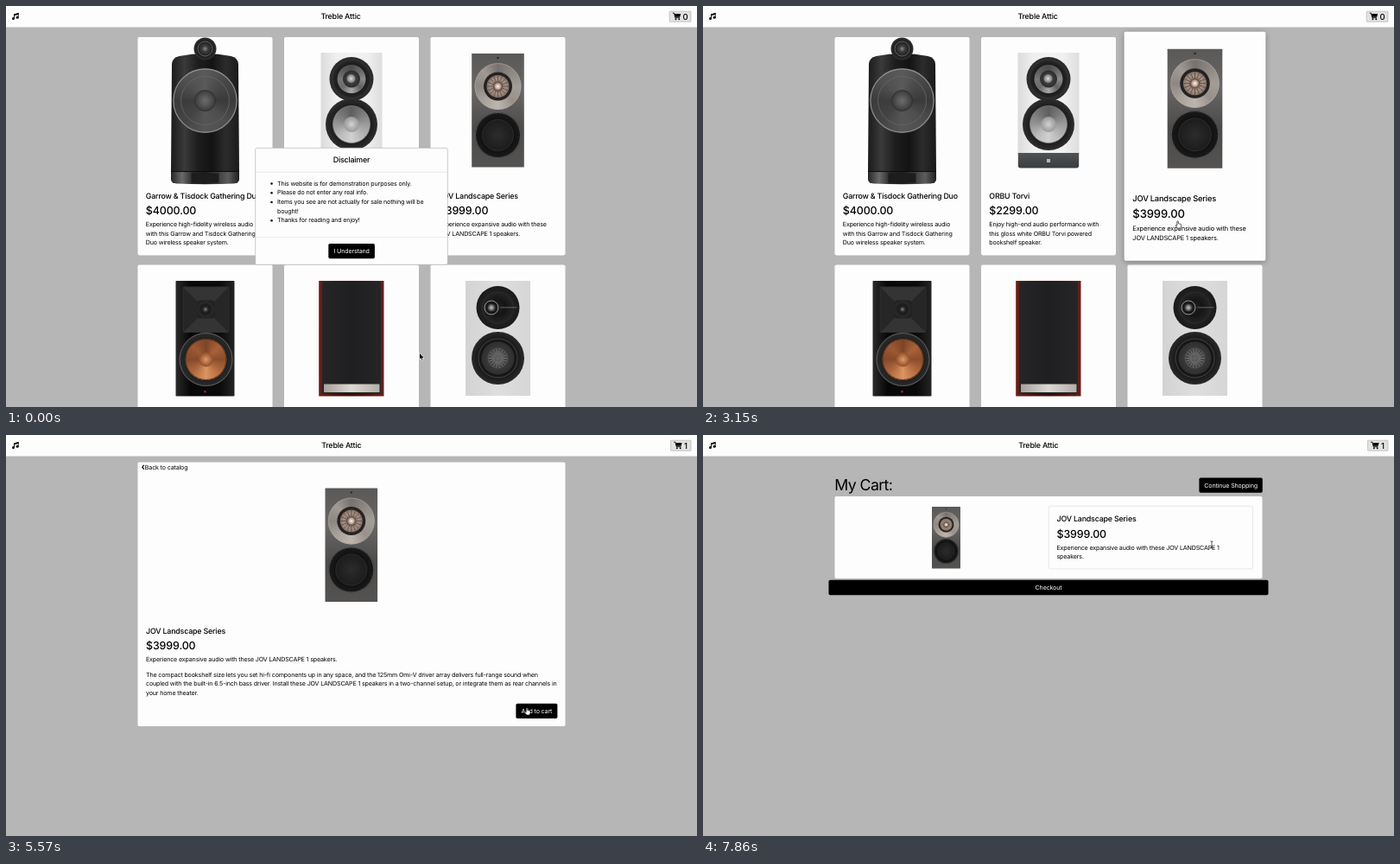
Write an HTML page with a canvas that moves like this. It is 800 by 464 pixels and loops after 8000 ms.

```html
<!DOCTYPE html>
<html lang="en">
<head>
<meta charset="utf-8">
<title>Treble Attic</title>
<style>
html, body { margin: 0; width: 100%; height: 100%; overflow: hidden; background: #b6b6b6; }
canvas { display: block; width: 800px; height: 464px; }
</style>
</head>
<body>
<canvas id="stage"></canvas>
<script>
const W = 800, H = 464, LOOP = 8000, FPS = 7;
const canvas = document.getElementById('stage');
const dpr = window.devicePixelRatio || 1;
canvas.width = W * dpr;
canvas.height = H * dpr;
const ctx = canvas.getContext('2d');
ctx.scale(dpr, dpr);

const WHITE = '#fdfdfd', GREY = '#b6b6b6', BLACK = '#000';
const BODY = 7.11, HEAD = 8.89, PRICE = 12.44, LEAD = 10.67;

// ---- helpers ----
function text(s, x, y, size = BODY, { weight = 400, align = 'left', color = BLACK, track = -0.022 } = {}) {
  ctx.font = `${weight} ${size}px Inter, "Liberation Sans", sans-serif`;
  ctx.letterSpacing = `${track * size}px`;
  ctx.textRendering = 'geometricPrecision';
  ctx.textAlign = align;
  ctx.fillStyle = color;
  ctx.fillText(s, x, y);
}
const lines = (list, x, y) => list.forEach((s, i) => text(s, x, y + i * LEAD));

function box(x, y, w, h, fill, r = 0, stroke) {
  ctx.beginPath();
  ctx.roundRect(x, y, w, h, r);
  ctx.fillStyle = fill;
  ctx.fill();
  if (stroke) {
    ctx.strokeStyle = stroke;
    ctx.lineWidth = 0.6;
    ctx.stroke();
  }
}

function button(label, x, y, w, h) {
  box(x, y, w, h, BLACK, 1.8);
  text(label, x + w / 2, y + h / 2 + 2.6, BODY, { align: 'center', color: '#fff' });
}

function fade(gradient, colors) {
  colors.forEach((c, i) => gradient.addColorStop(i / Math.max(1, colors.length - 1), c));
  return gradient;
}
const across = (x0, x1, ...colors) => fade(ctx.createLinearGradient(x0, 0, x1, 0), colors);
const down = (y0, y1, ...colors) => fade(ctx.createLinearGradient(0, y0, 0, y1), colors);

function circle(x, y, r, fill) {
  ctx.beginPath();
  ctx.arc(x, y, r, 0, 7);
  ctx.fillStyle = fill;
  ctx.fill();
}
const disc = (x, y, r, ...colors) =>
  circle(x, y, r, fade(ctx.createRadialGradient(x, y, 0, x, y, r), colors));
// brushed metal: colours run clockwise from the top
const sheen = (x, y, r, ...colors) =>
  circle(x, y, r, fade(ctx.createConicGradient(-Math.PI / 2, x, y), [...colors, colors[0]]));

function ring(x, y, r, color, width = 1) {
  ctx.beginPath();
  ctx.arc(x, y, r, 0, 7);
  ctx.strokeStyle = color;
  ctx.lineWidth = width;
  ctx.stroke();
}

function spokes(x, y, r0, r1, n, color, width) {
  ctx.beginPath();
  for (let i = 0; i < n; i++) {
    const a = i / n * Math.PI * 2, c = Math.cos(a), s = Math.sin(a);
    ctx.moveTo(x + c * r0, y + s * r0);
    ctx.lineTo(x + c * r1, y + s * r1);
  }
  ctx.strokeStyle = color;
  ctx.lineWidth = width;
  ctx.stroke();
}

function placed(x, y, scale, draw) {
  ctx.save();
  ctx.translate(x, y);
  ctx.scale(scale, scale);
  draw();
  ctx.restore();
}

// ---- speakers: x = 0 is the card's middle, y = 0 its top ----
function domeSpeaker() {
  const body = new Path2D('M-38.5 31Q-38 24 -30 22Q0 16 30 22Q38 24 38.5 31L39.5 156H-39.5Z');
  ctx.fillStyle = across(-40, 40, '#1a1a1a', '#3a3a3a', '#1d1d1d', '#131313', '#2c2c2c', '#191919');
  ctx.fill(body);
  ctx.fillStyle = across(-40, 40, '#222', '#6a6a6a', '#262626', '#1c1c1c', '#3a3a3a', '#5c5c5c', '#1c1c1c');
  ctx.fill(new Path2D('M-39.5 155.5H39.5V165Q39 169 33 169.5Q0 171 -33 169.5Q-39 169 -39.5 165Z'));
  box(-39.5, 155, 79, 1, '#0c0c0c');
  box(-16, 157.5, 32, 11, '#1d1d1d');
  disc(0, 13.5, 13, '#4a4a4a', '#383838', '#1b1b1b', '#303030');
  ring(0, 13.5, 8.5, '#777', 0.8);
  disc(0, 13.5, 3.6, '#8a8a8a', '#3a3a3a');
  sheen(0, 73.5, 37.5, '#5a5a5a', '#484848', '#3a3a3a', '#4e4e4e', '#565656', '#444', '#3c3c3c', '#505050');
  ring(0, 73.5, 36.6, '#909090', 1.1);
  ring(0, 73.5, 28, '#666', 0.8);
  disc(0, 73.5, 12, '#6c6c6c', '#555', '#3a3a3a');
  ring(0, 73.5, 12, '#2d2d2d', 0.8);
}

function whiteSpeaker() {
  box(-35.5, 18, 71, 118, across(-35, 35, '#dcdcdc', '#efefef', '#f2f2f2', '#f0f0f0', '#dedede'), 1);
  box(-35.2, 134, 70.4, 17.5, down(134, 151, '#505356', '#3a3d40'), [0, 0, 3, 3]);
  disc(0, 48.5, 25.5, '#333', '#222', '#1c1c1c', '#303030');
  ring(0, 48.5, 22, '#3c3c3c', 0.7);
  sheen(0, 48.5, 16.5, '#4c4c4c', '#666', '#8a8a8a', '#606060', '#a8a8a8', '#6c6c6c', '#777', '#5a5a5a');
  disc(0, 48.5, 10, '#555', '#2a2a2a');
  disc(-0.5, 48, 5, '#ddd', '#777');
  disc(0, 101, 30, '#222', '#1c1c1c', '#191919', '#2e2e2e');
  sheen(0, 101, 21.5, '#5e5e5e', '#7a7a7a', '#9c9c9c', '#b6b6b6', '#d0d0d0', '#bcbcbc', '#969696', '#777');
  disc(0, 101, 9, '#d4d4d4', '#b4b4b4', '#999');
  ring(0, 101, 21.5, '#888', 0.7);
  box(-2, 141, 4, 4, '#b8b8b8');
}

function slateSpeaker() {
  box(-30.3, 19, 60.6, 131.5, down(19, 150, '#5b5957', '#686664', '#4c4b4a', '#545352'), 0.5);
  box(-1, 23, 2, 2, '#222');
  sheen(0, 57, 27, '#77726e', '#8e8883', '#a39d97', '#999089', '#bdb6af', '#a8a29b', '#8d8782', '#a19a94');
  ring(0, 57, 26.5, '#aaa59f', 0.6);
  disc(0, 57, 16.5, '#1a1a1a', '#1d1d1d', '#262423');
  disc(0, 57, 13, '#6a574d', '#8a756a', '#a69084', '#857267');
  spokes(0, 57, 5, 12.5, 16, '#4f423b', 0.7);
  disc(0, 57, 5.5, '#fff3e8', '#c9ada0', '#4a3d36');
  disc(0, 113.5, 26.5, '#1d1d1d', '#141414', '#101010', '#1b1b1b');
  ring(0, 113.5, 26, '#777', 0.6);
  disc(0, 113.5, 18, '#2c2c2c', '#1c1c1c');
  ring(0, 113.5, 18, '#3c3c3c', 0.6);
}

function hornSpeaker() {
  box(-34, 18.5, 68, 133.5, across(-34, 34, '#2a2a2a', '#070707', '#0a0a0a', '#0a0a0a', '#242424'), 0.8);
  box(-25.5, 25.5, 53, 52.5, '#262626', 1, '#3a3a3a');
  ctx.fillStyle = '#343434';
  ctx.fill(new Path2D('M-25 26L27 26L9 44H-7ZM-25 78L27 78L9 60H-7Z'));
  box(-9, 41, 20, 21, '#222', 4);
  disc(0.5, 51.5, 9.5, '#484848', '#1a1a1a', '#2c2c2c');
  disc(0.5, 51.5, 2.5, '#8a8a8a', '#333');
  disc(1, 109.5, 31, '#111', '#111', '#2c2c2c');
  ring(1, 109.5, 30.5, '#777', 0.7);
  sheen(1, 109.5, 24, '#7d4526', '#a8623a', '#8a4d2b', '#b56d42', '#dc9462', '#b0683e', '#85492a', '#9c5933');
  ring(1, 109.5, 23.5, '#5a301b', 1);
  disc(1, 109.5, 8.5, '#e09a6a', '#b87046', '#8c4e2c');
  box(-1.2, 145.5, 2.4, 2.4, '#a3232a');
}

function grilleSpeaker() {
  box(-37.8, 18.5, 75.3, 133.5, across(-38, 38, '#6a2018', '#4a130e', '#35100c', '#4a130e', '#6a2018'));
  box(-34, 19.8, 68, 128.7, across(-34, 34, '#252527', '#1f1f21', '#252527'));
  box(-32, 138, 64.5, 9.5, across(-32, 32, '#a8a19b', '#dcd8d4', '#b4aea8'));
}

function silverSpeaker() {
  box(-37.5, 18.5, 75, 133, across(-37, 37, '#d3d3d4', '#dedede', '#d6d6d7'), 0.5);
  disc(0, 49.5, 25, '#222', '#151515', '#222', '#1a1a1a');
  ring(0, 49.5, 18, '#303030', 0.8);
  ring(-7.5, 49.5, 8, '#a4a4a4', 0.9);
  disc(-7.5, 49.5, 4.5, '#ccc', '#333');
  box(3, 49, 19, 0.8, '#777');
  disc(0, 108, 30.5, '#222', '#333', '#151515', '#292929');
  ring(0, 108, 22.5, '#444', 1);
  disc(0, 108, 19, '#4a4a4a', '#3c3c3c', '#2e2e2e');
  disc(0, 108, 11.5, '#666', '#3c3c3c');
  spokes(0, 108, 4, 11, 18, '#999', 0.5);
  ring(0, 108, 11.5, '#666', 0.6);
}

// ---- catalog ----
const products = [
  { draw: domeSpeaker, name: 'Garrow & Tisdock Gathering Duo', price: '$4000.00',
    blurb: ['Experience high-fidelity wireless audio', 'with this Garrow and Tisdock Gathering', 'Duo wireless speaker system.'] },
  { draw: whiteSpeaker, name: 'ORBU Torvi', price: '$2299.00',
    blurb: ['Enjoy high-end audio performance with', 'this gloss white ORBU Torvi powered', 'bookshelf speaker.'] },
  { draw: slateSpeaker, name: 'JOV Landscape Series', price: '$3999.00',
    blurb: ['Experience expansive audio with these', 'JOV LANDSCAPE 1 speakers.'] },
  { draw: hornSpeaker }, { draw: grilleSpeaker }, { draw: silverSpeaker }
];
const chosen = products[2];

function info(p, x, y, blurb = p.blurb) {
  text(p.name, x, y, HEAD, { weight: 500 });
  text(p.price, x, y + 18.3, PRICE, { weight: 500, track: -0.01 });
  lines(blurb, x, y + 32.3);
}

function card(i, zoom) {
  const p = products[i], cx = 230.5 + (i % 3) * 169.5, cy = (i < 3 ? 36 : 299.5) + 126.2;
  placed(cx, cy, 1 + 0.05 * zoom, () => {
    ctx.save();
    ctx.shadowColor = `rgba(0,0,0,${0.32 * zoom})`;
    ctx.shadowBlur = 6 * dpr;
    ctx.shadowOffsetY = 1.5 * dpr;
    box(-78, -126.2, 156, 252.4, WHITE, 1.8);
    ctx.restore();
    ctx.translate(0, -126.2);
    p.draw();
    if (p.name) info(p, -68.7, 186.6);
  });
}

function modal() {
  box(288.7, 164.3, 222.6, 135, WHITE, 2, '#a9a9a9');
  text('Disclaimer', 400, 181.4, HEAD, { weight: 500, align: 'center' });
  box(289, 191.8, 222, 0.6, '#dcdfe2');
  box(289, 267.2, 222, 0.6, '#dcdfe2');
  lines(['This website is for demonstration purposes only.', 'Please do not enter any real info.',
    'Items you see are not actually for sale nothing will be', 'bought!', 'Thanks for reading and enjoy!'], 314, 207.7);
  for (const row of [0, 1, 2, 4]) circle(307.5, 205.6 + row * LEAD, 1.25, BLACK);
  button('I Understand', 373.3, 275, 53.6, 17.2);
}

// ramp from 0 to 1 over two ticks and back again
const clamp = v => Math.max(0, Math.min(1, v));
const pulse = (k, on, off) => clamp((k - on) / 2) - clamp((k - off) / 2);

function catalog(k) {
  const zooms = [0, pulse(k, 12, 16), pulse(k, 16, 30), 0, 0, 0];
  const order = [0, 1, 2, 3, 4, 5].sort((a, b) => zooms[a] - zooms[b]);
  for (const i of order) card(i, zooms[i]);
  if (k < 12) modal();
}

function detail() {
  box(152.5, 31.5, 495, 305.5, WHITE, 1.8);
  ctx.strokeStyle = BLACK;
  ctx.lineWidth = 1.2;
  ctx.stroke(new Path2D('M159.8 34.8L157.8 37.2L159.8 39.6'));
  text('Back to catalog', 160.8, 39.9);
  placed(399.8, 42.5, 1, chosen.draw);
  info(chosen, 162, 229.6, [chosen.blurb.join(' ')]);
  lines(['The compact bookshelf size lets you set hi-fi components up in any space, and the 125mm Omi-V driver array delivers full-range sound when',
    'coupled with the built-in 6.5-inch bass driver. Install these JOV LANDSCAPE 1 speakers in a two-channel setup, or integrate them as rear channels in',
    'your home theater.'], 162, 279.8);
  button('Add to cart', 590.4, 310.8, 48, 17.2);
}

function cart() {
  text('My Cart:', 152.3, 63.8, 17.78, { track: -0.035 });
  button('Continue Shopping', 574.4, 49.5, 73.4, 17.2);
  box(152.5, 71, 495, 95, WHITE, 1.8);
  placed(281.5, 72.7, 0.544, chosen.draw);
  box(400.3, 82.3, 236.2, 72.6, WHITE, 1.8, '#d9d9d9');
  info(chosen, 409.5, 100.2, ['Experience expansive audio with these JOV LANDSCAPE 1', 'speakers.']);
  button('Checkout', 145.5, 167.8, 509, 17.4);
}

// ---- top bar ----
function navbar(count, hover) {
  box(0, 0, W, 24.4, WHITE);
  box(0, 24, W, 0.6, '#dedede');
  ctx.fillStyle = BLACK;
  ctx.fill(new Path2D('M9 9.4L14.6 7.8V9.8L9 11.4Z'));
  box(9, 9.6, 0.9, 5, BLACK);
  box(13.7, 8.4, 0.9, 5, BLACK);
  circle(8.5, 14.6, 1.5, BLACK);
  circle(13.2, 13.3, 1.5, BLACK);
  text('Treble Attic', count ? 388.3 : 387.5, 15.3, HEAD, { weight: 500, align: 'center' });

  const x = count ? 769.6 : 768.2, ink = hover ? '#fff' : BLACK;
  box(x, 6.2, 793 - x, 12, hover ? '#adadad' : '#e2e2e2', 0.5, '#aaa');
  placed(x + 3.6, 7.6, 1, () => {
    ctx.strokeStyle = ink;
    ctx.lineWidth = 0.9;
    ctx.stroke(new Path2D('M0 .6H1.7L3.1 6.1H8.2'));
    ctx.fillStyle = ink;
    ctx.fill(new Path2D('M1.9 1.3H9.4L8.4 5.1H2.9Z'));
    circle(3.6, 7.7, 0.95, ink);
    circle(7.5, 7.7, 0.95, ink);
  });
  text(count, x + 15.4, 15.5, 9.6, { weight: 500, color: ink });
}

// ---- pointer ----
const shapes = {
  arrow: new Path2D('M0 0V6.6L1.5 5.3L2.5 7.6L3.5 7.2L2.5 5H4.6Z'),
  hand: new Path2D('M-1 .9A.8 .8 0 0 1 .6 .9V3Q1.4 2.6 1.8 3.3Q2.6 3 2.9 3.7Q3.8 3.6 3.8 4.6V6L3.1 8.4H-.4L-2.4 5.8Q-2.8 4.6 -1.8 4.7L-1 5.4Z'),
  beam: new Path2D('M-1.4 -4.2Q0 -4.2 0 -3Q0 -4.2 1.4 -4.2M0 -3V3M-1.4 4.2Q0 4.2 0 3Q0 4.2 1.4 4.2')
};
// tick, x, y, shape until the next stop
const stops = [
  [0, 479, 402, 'arrow'], [7, 479, 402, 'arrow'], [10, 403, 284, 'hand'], [13, 403, 284, 'hand'],
  [15, 462, 267, 'hand'], [16, 489, 263.2, 'arrow'], [17, 514, 257, 'hand'], [20, 549.8, 248.8, 'hand'],
  [26, 549.8, 248.8, 'hand'], [27, 556, 256, 'arrow'], [30, 596, 308, 'arrow'], [32, 603.2, 315.6, 'hand'],
  [39, 603.2, 315.6, 'hand'], [40, 618, 295, 'arrow'], [44, 760, 60, 'arrow'], [46, 781.5, 17, 'hand'],
  [52, 781.5, 17, 'hand'], [53, 740, 45, 'arrow'], [54, 645, 100, 'arrow'], [55, 589, 127, 'beam']
];

function pointer(k) {
  const n = stops.findLastIndex(s => s[0] <= k);
  const [t0, x0, y0, shape] = stops[n];
  const [t1, x1, y1] = stops[n + 1] || [t0 + 1, x0, y0];
  const f = (k - t0) / (t1 - t0);
  placed(x0 + (x1 - x0) * f, y0 + (y1 - y0) * f, 1, () => {
    const path = shapes[shape];
    const arrow = shape === 'arrow';
    ctx.lineWidth = arrow ? 1.1 : 0.7;
    ctx.lineJoin = 'round';
    ctx.strokeStyle = arrow ? '#fff' : '#111';
    ctx.fillStyle = arrow ? BLACK : '#fff';
    if (arrow) ctx.stroke(path);
    if (shape !== 'beam') ctx.fill(path);
    if (!arrow) ctx.stroke(path);
  });
}

function render(ms) {
  const k = Math.floor((ms + 4) % LOOP * FPS / 1000);
  box(0, 0, W, H, GREY);
  if (k < 23) catalog(k);
  else if (k < 49) detail();
  else cart();
  navbar(k < 34 ? 0 : 1, k === 47 || k === 48);
  pointer(k);
}

const start = performance.now();
function loop() {
  render(performance.now() - start);
  requestAnimationFrame(loop);
}
loop();
</script>
</body>
</html>
```
